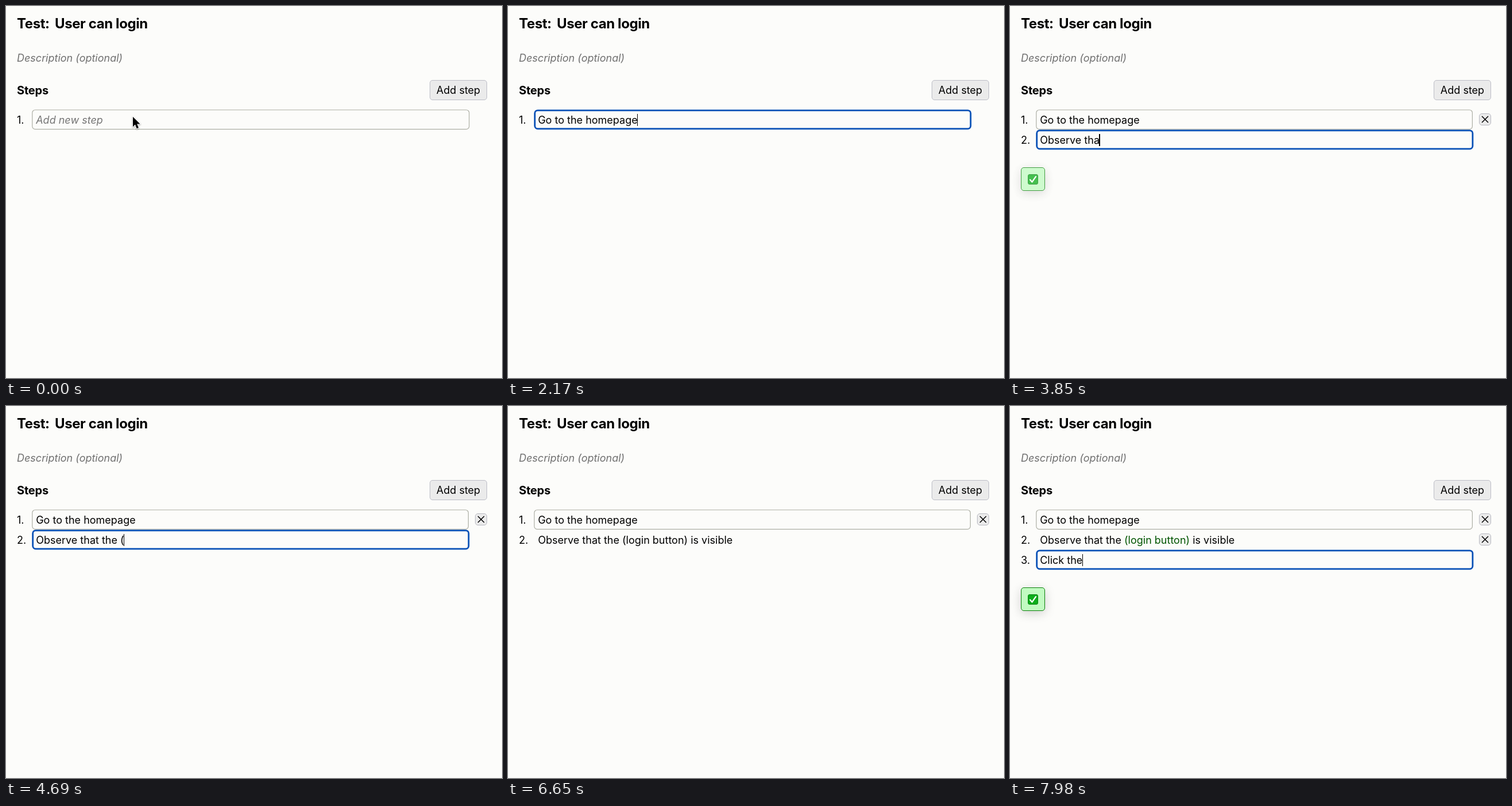
An HTML page that plays this animation: 864x648 px, repeating every 8 s.

```html
<!DOCTYPE html>
<html lang="en">
<head>
<meta charset="utf-8">
<title>Test steps</title>
<style>
html, body { margin: 0; width: 100%; height: 100%; overflow: hidden; }
body { background: #fcfcfa; color: #000; font: 18px/35px Inter, "Open Sans", sans-serif; }
#stage { position: relative; width: 864px; height: 648px; overflow: hidden; }
#stage div, #stage svg { position: absolute; box-sizing: border-box; white-space: pre; }
.title { top: 16px; font-size: 24px; font-weight: 700; line-height: 29px; letter-spacing: -.4px; }
.desc { left: 19px; top: 73px; font-style: italic; color: #707070; }
.steps { left: 19px; top: 135px; font-size: 20px; font-weight: 700; line-height: 24px; letter-spacing: -.2px; }
.add { left: 738px; top: 129px; width: 100px; height: 35px; line-height: 33px; text-align: center;
  background: #ebebeb; border: 1px solid #bcbdc6; border-radius: 5px; }
.row { left: 0; width: 864px; height: 35px; }
.num { left: 19px; top: 1px; }
.box { left: 45px; top: 0; overflow: visible; }
.box rect { x: .8px; y: 1px; width: 761px; height: 33.6px; rx: 5px;
  fill: none; stroke: #adafa5; stroke-width: 1.2px; }
.done .box rect { width: 759.6px; }
.plain .box rect { stroke: none; }
.focus .box rect { x: 1.7px; y: 1.8px; width: 759.2px; height: 32px; stroke: #0850b6; stroke-width: 2.8px; }
.text { left: 52.2px; top: 1px; }
.text span { position: relative; }
.text b { font-weight: 400; color: #005400; }
.empty .text { font-style: italic; color: #757575; }
.focus:not(.empty) .text span::after { content: ""; position: absolute; left: 100%; top: 0;
  margin-left: -.7px; width: 1.5px; height: 21px; background: #000; }
.del { left: 817px; top: 7px; visibility: hidden; }
.done .del { visibility: inherit; }
#toast { left: 19px; width: 42px; height: 41px; background: #c1fbc1; border: 1px solid #0b800b;
  border-radius: 5px; box-shadow: 0 4px 18px rgba(0, 0, 0, .18); }
#toast svg { left: 11px; top: 11px; }
#dot { left: 207px; top: 255px; width: 2px; height: 2px; background: #a0a0a0; border-radius: 1px;
  box-shadow: 0 5px 18px 8px rgba(0, 0, 0, .045); }
#cursor { left: 219px; top: 191px; overflow: visible; filter: drop-shadow(0 1px 1px rgba(0, 0, 0, .35)); }
</style>
</head>
<body>
<div id="stage">
  <div class="title" style="left:19px">Test:</div>
  <div class="title" style="left:85px">User can login</div>
  <div class="desc">Description (optional)</div>
  <div class="steps">Steps</div>
  <div class="add">Add step</div>
  <div id="dot"></div>
  <div id="toast">
    <svg width="18" height="18" viewBox="0 0 18 18">
      <rect x=".5" y=".5" width="17" height="17" rx="2.5" fill="#0cae1b" stroke="#078512"/>
      <path d="M4 9.6 7.4 13.6 14 4.2" fill="none" stroke="#fff" stroke-width="2.3" stroke-linecap="round" stroke-linejoin="round"/>
    </svg>
  </div>
  <svg id="cursor" width="18" height="26" viewBox="-2 -2 18 26">
    <path d="M0 0V17.4L4 13.6 6.8 20.4 10 19 7.2 12.4H12.6Z" stroke="#fff" stroke-width="2.2" stroke-linejoin="round" paint-order="stroke"/>
  </svg>
</div>
<script>
const LOOP = 8000;
// typing: [first key, last key, number of keys]
const steps = [
  { text: "Go to the homepage", show: 0, focus: 630, blur: 2380, done: 2450,
    typing: [[980, 1190, 4], [1330, 2170, 14]] },
  { text: "Observe that the (login button) is visible", show: 2450, focus: 2450, blur: 6510, done: 6790, plain: true,
    typing: [[2860, 2860, 1], [3080, 3080, 1], [3360, 4200, 15], [4340, 4340, 1],
             [4760, 5030, 3], [5240, 5240, 1], [5320, 6440, 20]] },
  { text: "Click the", show: 6720, focus: 6720, blur: LOOP, done: LOOP,
    typing: [[7000, 7490, 5], [7700, 7960, 4]] }
];
const stage = document.getElementById("stage");
const toast = document.getElementById("toast");
const dot = document.getElementById("dot");
const cursor = document.getElementById("cursor");

const between = (t, a, b) => t >= a && t < b;
const ramp = (t, a, b) => Math.min(1, Math.max(0, (t - a) / (b - a)));
const setVisible = (el, on) => { el.style.visibility = on ? "visible" : "hidden"; };

function keysTyped(typing, t) {
  let count = 0;
  for (const [a, b, n] of typing) {
    if (t >= a) count += n === 1 || t >= b ? n : Math.floor((t - a) * (n - 1) / (b - a)) + 1;
  }
  return count;
}

steps.forEach((step, i) => {
  const row = document.createElement("div");
  row.style.top = 180 + 35 * i + "px";
  row.innerHTML = `<div class="num">${i + 1}.</div>
    <svg class="box" width="763" height="36"><rect/></svg>
    <div class="text"><span></span></div>
    <svg class="del" width="21" height="21"><rect x=".5" y=".5" width="20" height="20" rx="4.5" fill="#ebebeb" stroke="#b9bac2"/>
    <path d="M5 5 16 16M16 5 5 16" stroke="#000" stroke-width="1.5"/></svg>`;
  stage.insertBefore(row, toast);
  step.row = row;
  step.label = row.querySelector("span");
});

function drawStep(step, t) {
  const count = keysTyped(step.typing, t);
  const done = t >= step.done;
  const classes = ["row"];
  if (between(t, step.focus, step.blur)) classes.push("focus");
  if (step.plain && t >= step.blur) classes.push("plain");
  if (done) classes.push("done");
  if (!count) classes.push("empty");
  step.row.className = classes.join(" ");
  setVisible(step.row, t >= step.show);

  let html = count ? step.text.slice(0, count) : "Add new step";
  if (done) html = html.replace(/\(.*\)/, "<b>$&</b>");
  if (step.html !== html) step.label.innerHTML = step.html = html;
}

function draw(t) {
  for (const step of steps) drawStep(step, t);

  toast.style.top = (t < 6000 ? 281 : 316) + "px";
  toast.style.opacity = ramp(t, 2500, 2780) - ramp(t, 3780, 4080) + ramp(t, 6760, 7040);
  setVisible(dot, between(t, 5040, 5780));

  const p = ramp(t, 0, 630);
  cursor.style.transform = `translateY(${4 * p * p * (3 - 2 * p)}px)`;
  setVisible(cursor, t < 840);
}

const start = performance.now();
function tick() {
  draw((performance.now() - start) % LOOP);
  requestAnimationFrame(tick);
}
tick();
</script>
</body>
</html>
```
